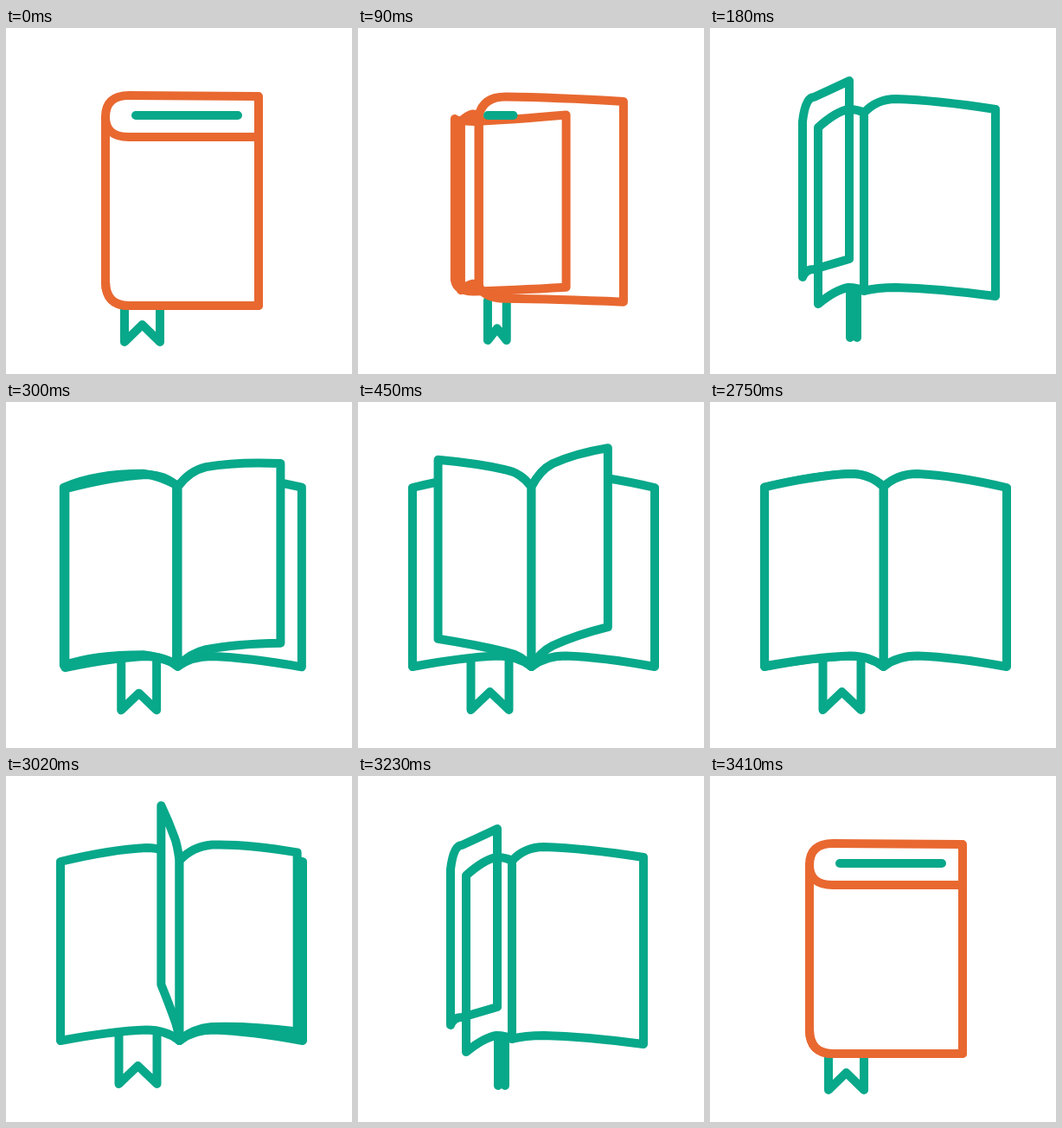
Animation, 400 px wide and 400 px high, one loop 4440 ms. Source, as an HTML page with a canvas:

```html
<!DOCTYPE html>
<html lang="en">
<head>
<meta charset="utf-8">
<title>Opening book</title>
<style>
  html, body { margin: 0; height: 100%; overflow: hidden; background: #fff; }
  canvas { display: block; width: 100vw; height: 100vh; }
</style>
</head>
<body>
<canvas width="400" height="400"></canvas>
<script>
const ctx = document.querySelector('canvas').getContext('2d');
const ORANGE = '#e86830', GREEN = '#08a88a';
const LOOP = 4440, STEP = 30, OPENED = 690, CLOSED_AT = 3410;
const MID = 180, SETTLED = 350, RECOLOR = 120;
const SPINE = 200.5;

// x, top and bottom each list spine, knee and outer edge.
// bend places the first control point, dip tilts the curve after the knee.
const leafPose = (x, top, bottom, bend = 0.4, dip = 0.12) =>
  [...x, ...top, ...bottom, bend, dip];
const openPose = x => leafPose(x, [98, 83, 99], [306, 293.5, 306]);
const closedPose = top => leafPose([115, 142, 292], top, [293, 321, 321], 0);
const mirror = x => SPINE - (x - SPINE) * 0.965;

const openX = [SPINE, 240, 343];
const openLeftX = openX.map(mirror);

// Each part has a closed, a halfway and an open pose.
const right = [
  closedPose([103, 78, 79]),
  leafPose([178, 215, 330], [98, 82, 94], [304, 300, 310]),
  openPose(openX)];
const left = [
  leafPose([115, 115, 115], [103, 103, 103], [293, 293, 293]),
  leafPose([178, 160, 125], [98, 94, 115], [304, 300, 319]),
  openPose(openLeftX)];
const cover = [
  closedPose([103, 126, 126]),
  leafPose([107, 120, 161], [108, 80, 61], [288, 279, 267], 0.25, 0.4),
  openPose([...openLeftX].reverse())];
// Centre, half width, top, tips, notch; the ribbon turns over as it moves.
const ribbon = [
  [157.5, 20.5, 323, 363, 343],
  [166, -4, 303, 358, 354],
  [152.5, -22, 298, 356, 335]];

const clamp = (v, lo = 0, hi = 1) => Math.min(hi, Math.max(lo, v));
const lerp = (a, b, k) => a + (b - a) * k;
const mix = (a, b, k) => a.map((v, i) => lerp(v, b[i], k));

function poseAt([closed, halfway, open], t) {
  if (t < MID) return mix(closed, halfway, (t / MID) ** 1.35);
  const rest = 1 - clamp((t - MID) / (SETTLED - MID));
  return mix(halfway, open, 1 - rest * rest);
}

function curve([spine, knee, edge], [y0, y1, y2], bend, dip) {
  return [
    [spine, y0],
    [lerp(spine, knee, bend), y1], [knee, y1],
    [lerp(knee, edge, 0.41), lerp(y1, y2, dip)], [edge, y2]];
}

function leafCurves(pose) {
  const x = pose.slice(0, 3), [bend, dip] = pose.slice(9);
  return [pose.slice(3, 6), pose.slice(6, 9)].map(y => curve(x, y, bend, dip));
}

function drawLeaf([top, bottom], color, filled) {
  ctx.strokeStyle = color;
  ctx.beginPath();
  ctx.moveTo(...top[4]);
  ctx.quadraticCurveTo(...top[3], ...top[2]);
  ctx.quadraticCurveTo(...top[1], ...top[0]);
  ctx.lineTo(...bottom[0]);
  ctx.quadraticCurveTo(...bottom[1], ...bottom[2]);
  ctx.quadraticCurveTo(...bottom[3], ...bottom[4]);
  ctx.closePath();
  if (filled) ctx.fill();
  ctx.stroke();
}

function drawLine(points) {
  ctx.strokeStyle = GREEN;
  ctx.beginPath();
  points.forEach(p => ctx.lineTo(...p));
  ctx.stroke();
}

function drawRibbon([mid, half, top, tip, notch]) {
  const a = mid - half, b = mid + half;
  drawLine([[a, top], [a, tip], [mid, notch], [b, tip], [b, top]]);
}

const turn = (t, start, end) =>
  (1 - Math.cos(Math.PI * clamp((t - start) / (end - start)))) / 2;

// A page narrows and lifts as it turns; it bulges on the way up and sags on the way down.
function drawPage(rightLeaf, leftLeaf, turned) {
  if (turned <= 0 || turned >= 1) return;
  const angle = Math.PI * turned, lift = 66 * Math.sin(angle) ** 1.5;
  const turnPoint = ([x, y], _, points) => {
    const spine = points[0][0];
    const along = (x - spine) / (points[4][0] - spine);
    return [
      lerp(spine, x, Math.abs(Math.cos(angle))),
      y - lift * along ** (0.8 + 0.9 * turned)];
  };
  const base = turned < 0.5 ? rightLeaf : leftLeaf;
  drawLeaf(base.map(points => points.map(turnPoint)), GREEN, true);
}

function draw(t) {
  ctx.fillStyle = '#fff';
  ctx.fillRect(0, 0, 400, 400);
  ctx.lineWidth = 10;
  ctx.lineCap = ctx.lineJoin = 'round';

  const color = t < RECOLOR ? ORANGE : GREEN;
  const [rightLeaf, leftLeaf, coverLeaf] =
    [right, left, cover].map(part => leafCurves(poseAt(part, t)));

  drawRibbon(poseAt(ribbon, t));
  if (t < SETTLED) drawLeaf(coverLeaf, color);
  drawLeaf(leftLeaf, color);
  drawLeaf(rightLeaf, color);

  const title = 1 - t / RECOLOR;
  if (title > 0) drawLine([[150, 101], [150 + 118 * title, 101]]);

  const first = turn(t, 195, 562), second = turn(t, 315, OPENED);
  const stack = first < 0.5 ? [second, first] : [first, second];
  stack.forEach(turned => drawPage(rightLeaf, leftLeaf, turned));
}

// Closing plays the opening backwards, in the same steps.
function openingTime(now) {
  const t = now % LOOP;
  return t < 2000
    ? Math.floor(Math.min(t, OPENED) / STEP) * STEP
    : Math.ceil(clamp(CLOSED_AT - t, 0, OPENED) / STEP) * STEP;
}

const start = performance.now();
function frame() {
  draw(openingTime(performance.now() - start));
  requestAnimationFrame(frame);
}
frame();
</script>
</body>
</html>
```
